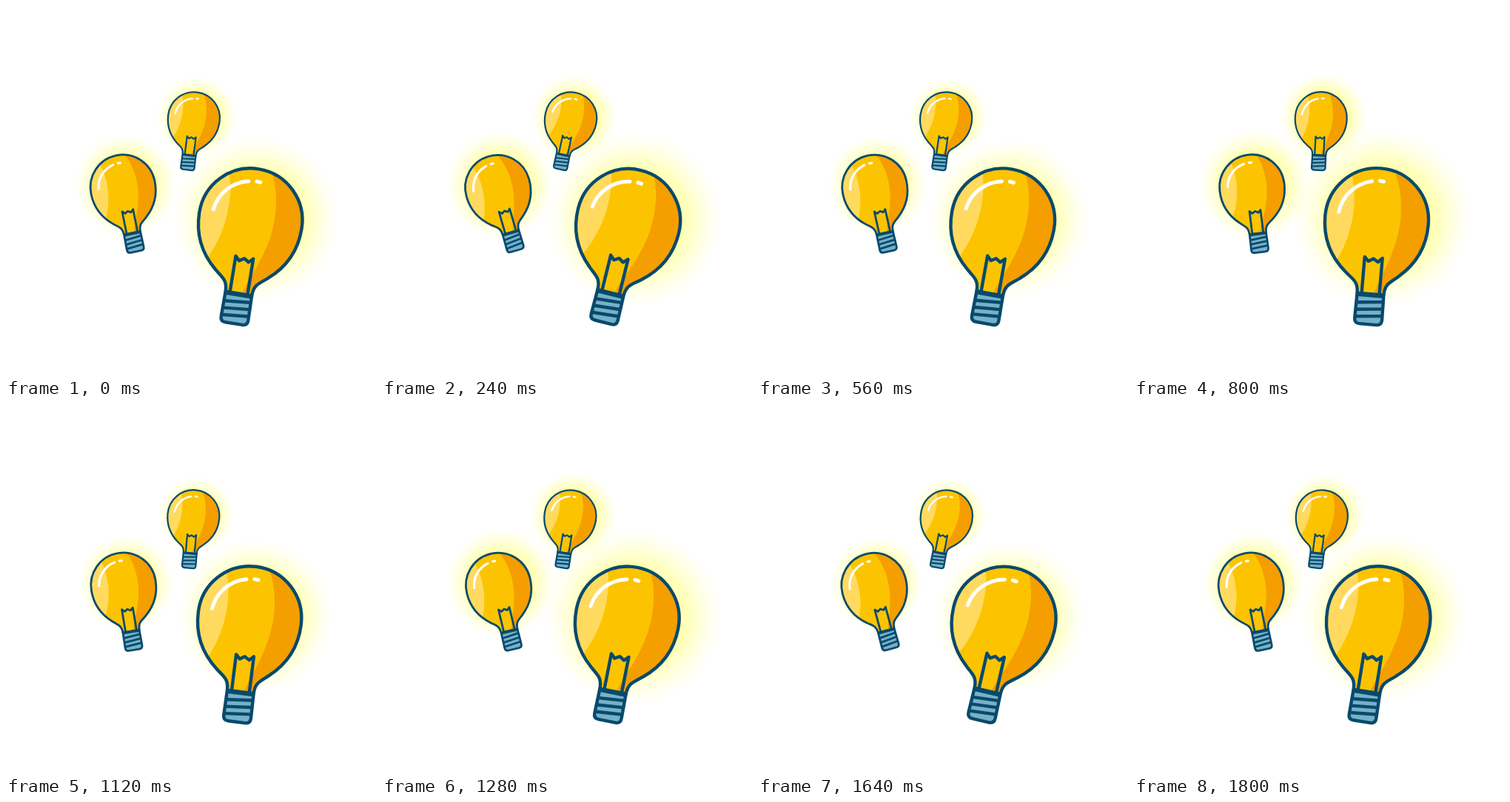
Animation of 500 by 500 pixels, one loop 1820 ms. Source, as an HTML page:

```html
<!DOCTYPE html>
<html>
<head>
<meta charset="utf-8">
<title>Light bulbs</title>
<style>
  html, body { margin: 0; width: 100%; height: 100%; overflow: hidden; background: #fff; }
  svg { display: block; width: 100%; height: 100%; }
  .line { fill: none; stroke: #084a6c; stroke-width: 4.4; stroke-linejoin: round; stroke-linecap: round; }
  .shine { fill: none; stroke: #fff; stroke-width: 5; stroke-linecap: round; }
</style>
</head>
<body>
<svg viewBox="0 0 500 500">
  <defs>
    <radialGradient id="halo" gradientUnits="userSpaceOnUse" cx="7" cy="-36" r="112">
      <stop offset=".6" stop-color="#ffff64" stop-opacity=".47"/>
      <stop offset=".75" stop-color="#ffff64" stop-opacity=".25"/>
      <stop offset=".88" stop-color="#ffff64" stop-opacity=".09"/>
      <stop offset="1" stop-color="#ffff64" stop-opacity="0"/>
    </radialGradient>
    <path id="glass" d="M-18 68C-18 52-26 50-36 41C-56 24-70 0-70-32C-70-71-39-102.5 0-102.5S70-71 70-32C70 0 56 24 36 41C26 50 18 52 18 68Z"/>
    <clipPath id="inside"><use href="#glass"/></clipPath>
    <g id="bulb">
      <circle cx="7" cy="-36" r="140" fill="url(#halo)"/>
      <g clip-path="url(#inside)">
        <use href="#glass" fill="#fcc400"/>
        <path fill="#ffda5e" d="M-41-97C-28-65-28-15-50 28H-80V-97Z"/>
        <path fill="#f59e00" d="M15-106C34-75 36-30 26 4C20 30 9 48 4 70H80V-106Z"/>
      </g>
      <path class="line" d="M-12 68V18.5L-6.5 24L0 20L6.5 24L12 18.5V68"/>
      <use href="#glass" class="line"/>
      <path class="shine" d="M-52-39A52.5 52.5 0 0 1-11-84M0-85.5L5-85"/>
      <path class="line" style="fill:#76b1c9" d="M-18 68.5H18L18.5 102Q18.5 109 11.5 109H-11.5Q-18.5 109-18.5 102Z"/>
      <path class="line" d="M-17 70H17M-17 80.5L17 77.5M-17 90L17 87M-17 99.5L17 96.5"/>
    </g>
  </defs>
  <use class="bulb" href="#bulb"/>
  <use class="bulb" href="#bulb"/>
  <use class="bulb" href="#bulb"/>
</svg>
<script>
const LOOP = 1820, STEP = 20, SWING = 1200, PULSE = 600;
const bulbs = [
  { x: 325.3, y: 321.5, size: 1, tilt: 9.2, sway: 5 },
  { x: 162, y: 264.9, size: .627, tilt: -11.5, sway: -5 },
  { x: 251.9, y: 167.4, size: .5, tilt: 7.3, sway: 5 }
];
const nodes = document.querySelectorAll('.bulb');
const halo = document.getElementById('halo');
const wave = (t, period) => Math.sin(2 * Math.PI * t / period);
const start = performance.now();

function draw() {
  const elapsed = (performance.now() - start) % LOOP;
  const t = Math.floor(elapsed / STEP) * STEP;
  bulbs.forEach(({ x, y, size, tilt, sway }, i) => {
    const angle = tilt + sway * wave(t, SWING);
    nodes[i].setAttribute('transform', `translate(${x} ${y}) rotate(${angle}) scale(${size})`);
  });
  halo.setAttribute('r', 112 + 10 * wave(t, PULSE));
  requestAnimationFrame(draw);
}
draw();
</script>
</body>
</html>
```
